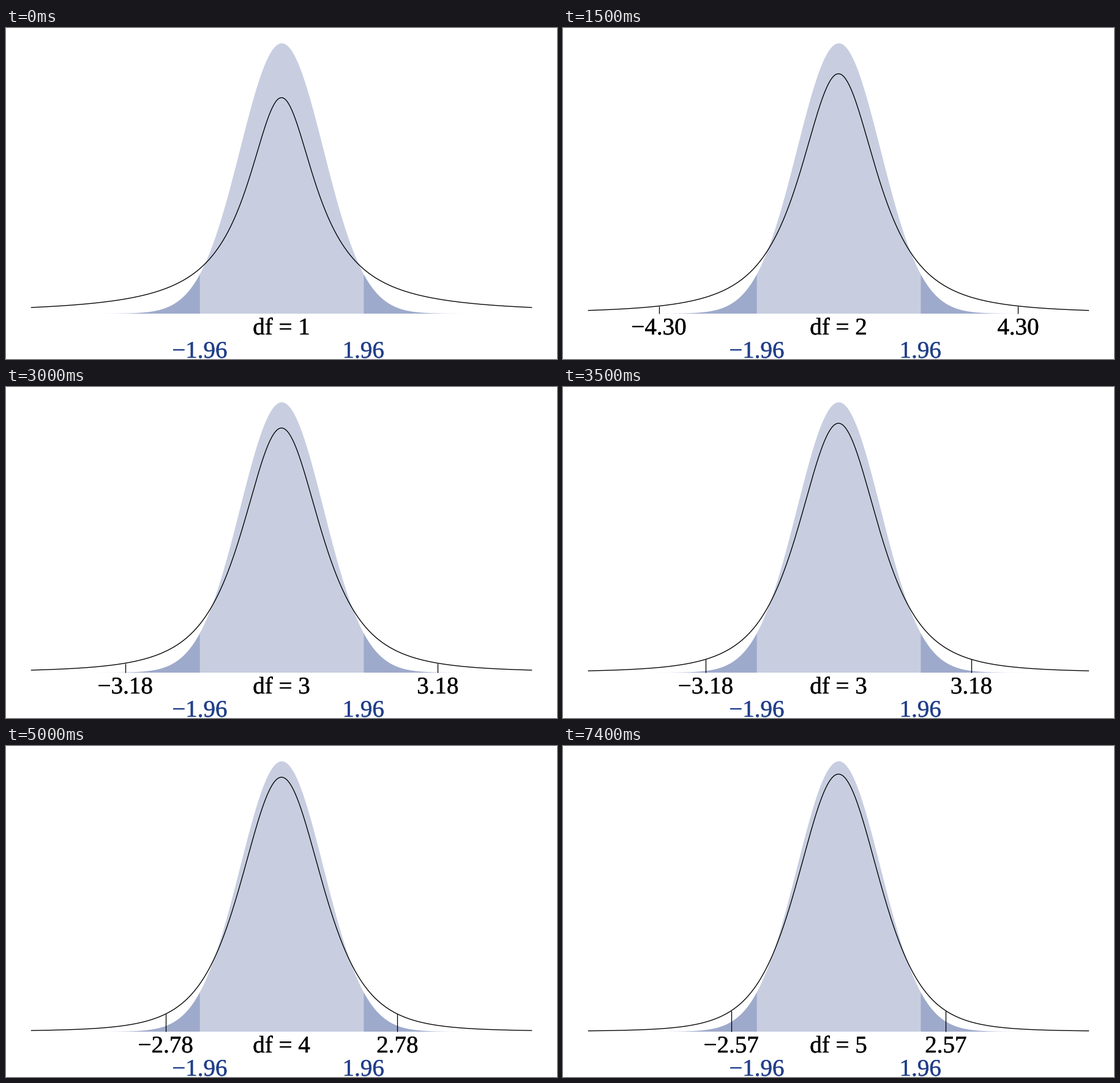
Animation of 900 by 540 pixels, one loop 8000 ms. Source, as a matplotlib script:

```python
import math

import matplotlib.pyplot as plt
import numpy as np
from matplotlib import patheffects
from matplotlib.animation import FuncAnimation

W, H, DPI = 900, 540, 72          # at 72 dpi one point is one pixel
CX, BASE = 450, 465.5             # pixel position of x = 0, density = 0
SX, SY = 68.2, 1105.5             # pixels per unit
Z = 1.96
LIGHT, DARK, BLUE = "#c8cee0", "#9eaacb", "#213f8a"

# Two-sided 5 % critical values of Student's t
CRITICAL = {2: 4.303, 3: 3.182, 4: 2.776, 5: 2.571}

# (shown df, df the curve comes from, number of 500 ms steps)
# Where the two differ, the curve is halfway between both.
STAGES = [(1, 1, 2), (2, 1, 1), (2, 2, 3), (3, 2, 1), (3, 3, 3), (4, 4, 3), (5, 5, 3)]
STEPS = [(df, prev) for df, prev, n in STAGES for _ in range(n)]


def normal(x):
    return np.exp(-x**2 / 2) / math.sqrt(2 * math.pi)


def student(x, df):
    c = math.gamma((df + 1) / 2) / (math.sqrt(df * math.pi) * math.gamma(df / 2))
    return c * (1 + x**2 / df) ** (-(df + 1) / 2)


def blend(x, df, prev):
    return (student(x, df) + student(x, prev)) / 2


def px(x):
    return CX + SX * x


def py(d):
    return BASE - SY * d


plt.rcParams.update({"font.family": "Liberation Serif", "text.hinting": "none"})
fig = plt.figure(figsize=(W / DPI, H / DPI), dpi=DPI, facecolor="white")
ax = fig.add_axes([0, 0, 1, 1])
ax.set_xlim(0, W)
ax.set_ylim(H, 0)
ax.axis("off")


def fill(a, b, color):
    x = np.linspace(a, b, 400)
    ax.fill_between(px(x), py(normal(x)), BASE, color=color, lw=0)


def label(x, y, text="", color="black"):
    return ax.text(x, y, text, color=color, size=39, ha="center", va="baseline",
                   path_effects=[patheffects.withStroke(linewidth=0.4, foreground=color)])


def signed(v):
    return f"{v:.2f}".replace("-", "\u2212")


fill(-Z, Z, LIGHT)
for side in (-1, 1):
    fill(side * Z, side * 4.5, DARK)
    label(px(side * Z), 538, signed(side * Z), BLUE)

xs = np.linspace(-6, 6, 601)
curve, = ax.plot([], [], color="black", lw=1.35, solid_capstyle="butt")
df_label = label(CX, 500)
marks = [(side, ax.plot([], [], color="black", lw=1.3, solid_capstyle="butt")[0], label(0, 500))
         for side in (-1, 1)]


def draw(i):
    df, prev = STEPS[i]
    curve.set_data(px(xs), py(blend(xs, df, prev)))
    df_label.set_text(f"df = {df}")
    shown = prev in CRITICAL
    for side, tick, text in marks:
        tick.set_visible(shown)
        text.set_visible(shown)
        if shown:
            t = side * (CRITICAL[df] + CRITICAL[prev]) / 2
            tick.set_data([px(t)] * 2, [BASE, py(blend(t, df, prev))])
            text.set_x(px(t))
            text.set_text(signed(side * CRITICAL[df]))
    return [curve, df_label]


anim = FuncAnimation(fig, draw, frames=len(STEPS), interval=500, repeat=True, repeat_delay=0)
plt.show()
```
